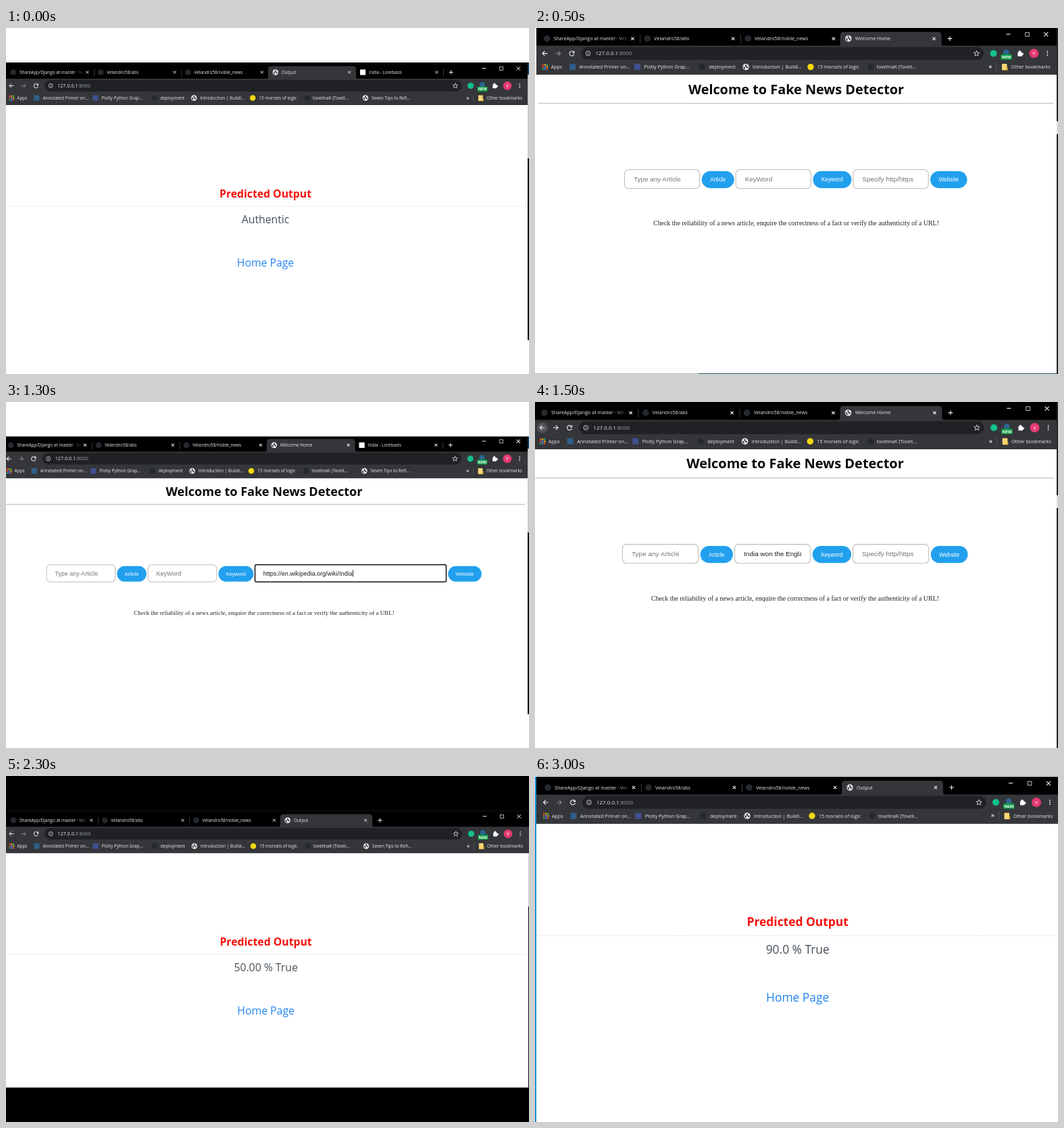
An HTML page that plays this animation: 774 by 512 pixels, repeating every 3.5 s.

```html
<!DOCTYPE html>
<html lang="en">
<head>
<meta charset="utf-8">
<title>News checker demo</title>
<style>
html, body { margin: 0; width: 100%; height: 100%; overflow: hidden; background: #fff; }
svg { display: block; }
#stage { width: 774px; height: 512px; }
text { font-family: "Open Sans", "Noto Sans", sans-serif; white-space: pre; }
.arial { font-family: "Liberation Sans", Arial, sans-serif; }
.times { font-family: "Liberation Serif", "Times New Roman", serif; }
.line { fill: none; stroke: #f1f3f4; stroke-width: 1.1; }
</style>
</head>
<body>
<svg id="stage" viewBox="0 0 774 512">
  <defs>
    <linearGradient id="fade">
      <stop offset="0" stop-color="#000" stop-opacity="0"/>
      <stop offset="1" stop-color="#000"/>
    </linearGradient>
  </defs>
</svg>
<script>
const STEP = 500;
const BAR = '#35363a', INK = '#e8eaed', DARK = '#24292e';

// x, y: window origin; s: zoom; r: right edge the controls hang on; pitch: tab width
const big = { y: -0.3, s: 1, r: 771, top: 0, end: 512, left: 0, right: 772, pitch: 149, tabs: 4 };
const small = { x: -4.5, y: 51, s: 0.906, r: 771, top: 51, end: 462, left: 0, right: 772, pitch: 149, tabs: 4 };
const smallEdge = [[772, 51, 2, 18, '#123a5c'], [772, 69, 2, 124, '#c9c9c9'], [772, 193, 2, 269, '#000']];
const bigEdge = [[772, 0, 2, 138, '#222'], [772, 138, 2, 19, '#ddd'], [772, 157, 2, 355, '#222']];

const scenes = [
  { ...small, pitch: 142.7, tabs: 5, edge: smallEdge,
    result: { text: 'Authentic', cx: 384, ys: [245.5, 264, 283, 347] } },
  { ...big, x: 0.7, s: 0.998, r: 770.3, left: 2,
    edge: [...bigEdge, [0, 511, 242, 1, '#a9bab8'], [242, 511, 530, 1, '#1f4f63']],
    form: { cx: 386.5, ys: [91, 111.5, 223.5, 288], x: 132.5, hr: [5, 767] } },
  { ...small, x: -8.3, y: 49.3, s: 0.91, end: 461, pitch: 142.7, tabs: 5, edge: smallEdge,
    form: { cx: 382, ys: [132, 151.5, 253.5, 312], x: 60, hr: [0, 768], focus: 2,
      typed: 'https://en.wikipedia.org/wiki/India', caret: true } },
  { ...big, x: -3.2, y: -0.2, s: 1.006, r: 771.7, edge: bigEdge, back: true,
    form: { cx: 385, ys: [91, 112.5, 224.7, 290], x: 129.5, hr: [1, 768], fill: 1, typed: 'India won the England' } },
  { ...small, s: 0.908, r: 772, end: 461, right: 774, black: true,
    edge: [[773, 114, 1, 79, '#ccc'], [773, 193, 1, 268, '#000']],
    result: { text: '50.00 % True', cx: 384.6, ys: [245.5, 264, 283, 347] } },
  { ...small, y: 50, top: 50, end: 463, edge: smallEdge,
    form: { cx: 384, ys: [132.5, 152, 253.2, 311.7], x: 63.5, hr: [0, 768], focus: 0,
      typed: 'Harlan Brisk has defied all expectations from the very start of his' } },
  { ...big, x: 2, y: 1, r: 774, top: 1, left: 2, right: 774, edge: [[0, 1, 2, 511, '#1593d6']],
    result: { text: '90.0 % True', cx: 388.7, ys: [216, 236.5, 257, 328] } },
];

const rect = (x, y, w, h, fill, extra = '') =>
  `<rect x="${x}" y="${y}" width="${w}" height="${h}" fill="${fill}" ${extra}/>`;
const dot = (x, y, r, fill) => `<circle cx="${x}" cy="${y}" r="${r}" fill="${fill}"/>`;
const line = (d, extra = '') => `<path class="line" d="${d}" ${extra}/>`;
const at = (x, y, s, body) => `<g transform="translate(${x} ${y}) scale(${s})">${body}</g>`;
const clip = (x, y, w, h, body) =>
  `<svg x="${x}" y="${y}" width="${w}" height="${h}" viewBox="${x} ${y} ${w} ${h}">${body}</svg>`;
// y is the middle of the capitals
const text = (x, y, size, fill, str, extra = '') =>
  `<text x="${x}" y="${y + size * 0.36}" font-size="${size}" fill="${fill}" ${extra}>${str}</text>`;
const MID = 'text-anchor="middle"';

const cross = (x, y, r) => line(`M${x - r} ${y - r}l${2 * r} ${2 * r}m0 ${-2 * r}l${-2 * r} ${2 * r}`);
const globe = (x, y) => at(x, y, 1, dot(0, 0, 4.7, '#f1f3f4') +
  `<path fill="${BAR}" d="M-3.6-1.2L-1.2 .6L-.8 3.6C-3 3.2-4-.2-3.6-1.2ZM-.8-3.4L1.4-3.2L.6-1.4L2.6 0L3.6-1L3 2L1 1.6L.4 .2L-1.4-.8Z"/>`);
const square = (x, y, fill) => rect(x - 4.5, y - 4.5, 9, 9, fill);
const mark = (x, y) => dot(x, y, 4.8, DARK);

function tabStrip(sc) {
  const names = ['ShareApp/Django at master · Velandro58', 'Velandro58/abs', 'Velandro58/noble_news',
    sc.form ? 'Welcome Home' : 'Output', 'India - Lorebasis'];
  const p = sc.pitch;
  let out = '';
  for (let i = 0; i < sc.tabs; i++) {
    const x = 27 + i * p, a = x - 22, b = a + p + 1;
    if (i === 3) {
      out += `<path fill="${BAR}" d="M${a - 4} 27q4 0 4-4V11q0-5 5-5H${b - 5}q5 0 5 5V23q0 4 4 4Z"/>`;
    }
    out += i < 3 ? mark(x - 10, 16) : i === 3 ? globe(x - 10, 16) : square(x - 10, 16, '#fff');
    const room = p - 39;
    out += clip(x, 8, room, 16, text(x, 16, 7.1, INK, names[i]));
    if (!i) out += rect(x + room - 16, 8, 17, 16, 'url(#fade)');
    out += cross(x + p - 32, 16, 2.1);
    if (i < 2 || i === 4) out += rect(x + p - 21, 10.5, 0.7, 12, '#55575a');
  }
  const plus = 27 + sc.tabs * p - 8.5;
  return out + line(`M${plus - 3.3} 16h6.6m-3.3-3.3v6.6`);
}

function toolbar(sc) {
  const arrow = (x, d, color) =>
    line(`M${x - 3.6 * d} 38h${7.2 * d}m${-3.4 * d}-3.4l${3.4 * d} 3.4l${-3.4 * d} 3.4`, `style="stroke:${color}"`);
  return (sc.back ? dot(14, 38, 8, '#505155') : '') +
    arrow(14, -1, '#f1f3f4') + arrow(33.5, 1, sc.back ? '#f1f3f4' : '#85878a') +
    line('M56.6 35.8a3.5 3.5 0 1 0 .8 3.2') + '<path fill="#f1f3f4" d="M58 34v3.6h-3.6Z"/>' +
    line('M74.7 38a3.3 3.3 0 1 0 6.6 0a3.3 3.3 0 1 0-6.6 0M78 37.5v2.2M78 35.9v.9', 'style="stroke-width:.8"') +
    text(89, 38, 7.96, INK, '127.0.0.1<tspan fill="#9aa0a6">:8000</tspan>');
}

function bookmarks(sc) {
  const y = 58, label = (x, s) => text(x, y, 7.1, INK, s);
  let out = '';
  ['#ea4335', '#fbbc04', '#34a853', '#ea4335', '#4285f4', '#fbbc04', '#34a853', '#4285f4', '#ea4335']
    .forEach((c, i) => out += rect(10 + i % 3 * 3.1, 53.8 + Math.floor(i / 3) * 3.1, 2.3, 2.3, c));
  out += label(23, 'Apps') +
    square(55, y, '#2f5f88') + label(65, 'Annotated Primer on...') +
    square(151, y, '#3f4f8f') + label(161, 'Plotly Python Grap...') +
    mark(247, y) + label(257, 'deployment') +
    globe(312, y) + label(322, 'Introduction | Buildi...') +
    dot(408, y, 4.7, '#f5d90a') + label(418, '15 morsels of logic') +
    mark(497, y) + label(506, 'tovelinaK (Toveli...');
  if (sc.top > 20) out += globe(592, y) + label(602, 'Seven Tips to Refi...');
  return out;
}

function controls() {
  const star = Array.from({ length: 10 }, (_, i) => {
    const a = i * Math.PI / 5 - Math.PI / 2, r = i % 2 ? 1.9 : 4.3;
    return `${(657 + r * Math.cos(a)).toFixed(2)} ${(38.2 + r * Math.sin(a)).toFixed(2)}`;
  }).join('L');
  return line('M701 9.5h6') + line('M729.3 7h5.6v5.6h-5.6Z', 'style="stroke-width:.8"') + cross(760, 9.8, 3) +
    line(`M${star}Z`, 'style="stroke-width:.8"') +
    dot(682, 38, 5, '#12c08c') +
    dot(701, 36.5, 4.4, '#2c6592') + rect(693, 39.5, 16.5, 8, '#0f9d45', 'rx="1.2"') +
    text(701.2, 43.6, 6, '#fff', 'NEW', MID + ' font-weight="700"') +
    rect(718, 35.8, 6.5, 6.5, '#fff', 'rx=".8"') + dot(721, 35.3, 1.6, '#fff') + dot(725, 39, 1.6, '#fff') +
    dot(742, 38, 7, '#e4396f') + text(742, 38, 7, '#fff', 'V', MID) +
    [35, 38, 41].map(y => dot(762, y, 0.9, '#f1f3f4')).join('') +
    text(675, 57.5, 8, INK, '»', 'font-weight="700"') +
    rect(686, 52, 0.7, 12, '#5f6165') + rect(694.5, 53.5, 7.5, 9.5, '#f7d774', 'rx=".8"') +
    rect(700.5, 58.5, 2.5, 4.5, '#e5b93f') +
    text(708, 58, 7.1, INK, 'Other bookmarks');
}

function browser(sc) {
  const { x, y, s, r, top, end, left, right } = sc, w = right - left;
  const seam = y + 26.5 * s, foot = y + 69.5 * s;
  const pillX = x + 68 * s, pillEnd = r - 106.5 * s;
  return rect(left, top, w, end - top, '#fff') +
    rect(left, top, w, foot - top, '#000') + rect(left, seam, w, foot - seam, BAR) +
    rect(pillX, y + 28.6 * s, pillEnd - pillX, 18.8 * s, '#202124', `rx="${9.4 * s}"`) +
    at(x, y, s, tabStrip(sc) + toolbar(sc) + bookmarks(sc)) +
    at(r - 774 * s, y, s, controls());
}

function resultPage({ s, left, right, result: { text: answer, cx, ys } }) {
  const size = 17.4 * s, row = (i, fill, str, extra = '') => text(cx, ys[i], size, fill, str, `${MID} ${extra}`);
  return row(0, '#f5100c', 'Predicted Output', 'font-weight="700"') +
    `<path d="M${left} ${ys[1]}H${right}" stroke="#dcdcdc" stroke-width=".8" stroke-dasharray="2 1"/>` +
    row(2, '#46505a', answer) + row(3, '#2384f0', 'Home Page');
}

function formPage({ s, form: f }) {
  const [titleY, hrY, rowY, noteY] = f.ys;
  const fields = [['Type any Article', 'Article', 48], ['KeyWord', 'Keyword', 57], ['Specify http/https', 'Website', 54.5]];
  let x = 0;
  const row = fields.map(([hint, name, bw], i) => {
    const on = f.focus === i, typed = on || f.fill === i, w = on ? 311 : 111.5;
    const box = rect(x, -14, w, 28, '#fff', on
      ? 'rx="2.5" stroke="#15151a" stroke-width="1.7"' : 'rx="6" stroke="#bdbdbd" stroke-width="1.1"');
    const words = text(x + 13.5, 0, 9.92, typed ? '#1c1c1c' : '#757575', typed ? f.typed : hint, 'class="arial"');
    const caret = on && f.caret ? rect(x + 159, -5.5, 0.9, 11, '#000') : '';
    const bx = x + w + 3;
    const button = rect(bx, -11.7, bw, 25.2, '#22a0ee', 'rx="12.6"') +
      text(bx + bw / 2, 0.8, 8.27, '#fff', name, `class="arial" ${MID}`);
    const inner = clip(x + 13, -11, w - 26, 22, words);
    x = bx + bw + 2.5;
    return box + inner + caret + button;
  }).join('');
  return text(f.cx, titleY, 19.87 * s, '#080808', 'Welcome to Fake News Detector', `${MID} font-weight="700"`) +
    rect(f.hr[0], hrY - 0.7, f.hr[1] - f.hr[0], 1.4, '#c6c6c6') +
    at(f.x, rowY, s, row) +
    text(f.cx, noteY, 9.92 * s, '#1f2327', 'Check the reliability of a news article, enquire the correctness of a fact ' +
      'or verify the authenticity of a URL!', `class="times" ${MID}`);
}

const stage = document.getElementById('stage');
const views = scenes.map(sc => {
  const g = document.createElementNS('http://www.w3.org/2000/svg', 'g');
  g.innerHTML = rect(0, 0, 774, 512, sc.black ? '#000' : '#fff') + browser(sc) +
    (sc.black ? rect(0, 51, 774, 0.7, '#1c1c1c') : '') +
    (sc.form ? formPage(sc) : resultPage(sc)) +
    sc.edge.map(e => rect(...e)).join('');
  g.style.display = 'none';
  return stage.appendChild(g);
});

const start = performance.now();
let shown = -1;
function draw() {
  const now = Math.floor((performance.now() - start) / STEP) % views.length;
  if (now !== shown) {
    views.forEach((g, i) => g.style.display = i === now ? '' : 'none');
    shown = now;
  }
  requestAnimationFrame(draw);
}
draw();
</script>
</body>
</html>
```
